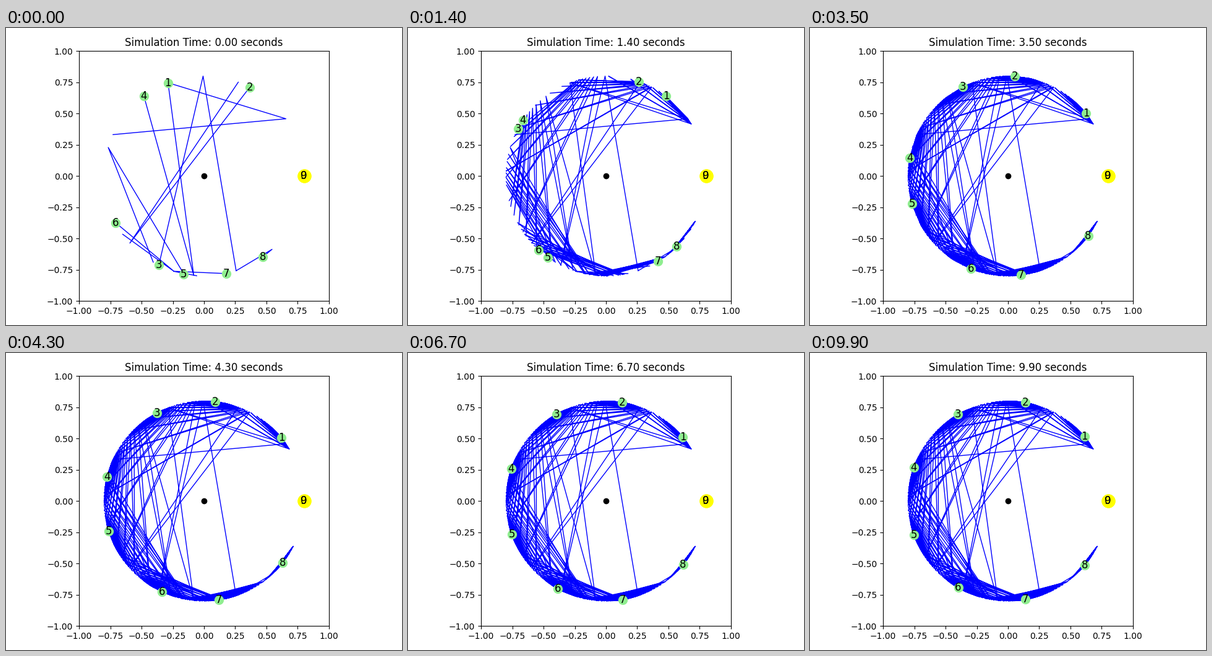
Recreate the animation shown at these times as a matplotlib script. Size 640 by 480 pixels, loop 10 s.

```python
import numpy as np
import matplotlib.pyplot as plt
from matplotlib.animation import FuncAnimation

FRAMES = 100
STEP_MS = 100
RADIUS = 0.8
START = [0, 155.5, 69.95, 288.75, 111.1, 239.5, 215.6, 265.8, 288.8, 360]


def simulate(start, steps):
    """Each inner agent moves to the mean angle of its two neighbours."""
    states = [np.radians(start)]
    for _ in range(steps):
        prev = states[-1]
        new = prev.copy()
        new[1:-1] = (prev[:-2] + prev[2:]) / 2
        states.append(new)
    return np.array(states)


# Two steps have already been taken when the clock reads zero.
angles = simulate(START, FRAMES + 1)
xs, ys = RADIUS * np.cos(angles), RADIUS * np.sin(angles)
count = len(START)

fig, ax = plt.subplots(figsize=(6.4, 4.8), dpi=100)
ax.set_aspect("equal")
ax.set(xlim=(-1, 1), ylim=(-1, 1))
ticks = np.linspace(-1, 1, 9)
ax.set_xticks(ticks)
ax.set_yticks(ticks)
title = ax.set_title("Simulation Time: 0.00 seconds")
fig.tight_layout()

ax.plot(0, 0, "ko")
trails = [ax.plot([], [], "b-", lw=1)[0] for _ in range(count)]
dots, labels = [], []
for i in range(count):
    fixed = i in (0, count - 1)
    dots.append(ax.plot([], [], "o", color="yellow" if fixed else "lightgreen",
                        ms=15 if fixed else 10)[0])
    labels.append(ax.text(0, 0, str(i), fontsize=12, ha="center", va="center"))


def update(frame):
    now = frame + 2
    for i in range(count):
        x, y = xs[now, i], ys[now, i]
        trails[i].set_data(xs[:now + 1, i], ys[:now + 1, i])
        dots[i].set_data([x], [y])
        labels[i].set_position((x, y))
    title.set_text(f"Simulation Time: {frame * STEP_MS / 1000:.2f} seconds")
    return [*trails, *dots, *labels, title]


anim = FuncAnimation(fig, update, frames=FRAMES, interval=STEP_MS,
                     repeat=True, repeat_delay=0)
plt.show()
```
